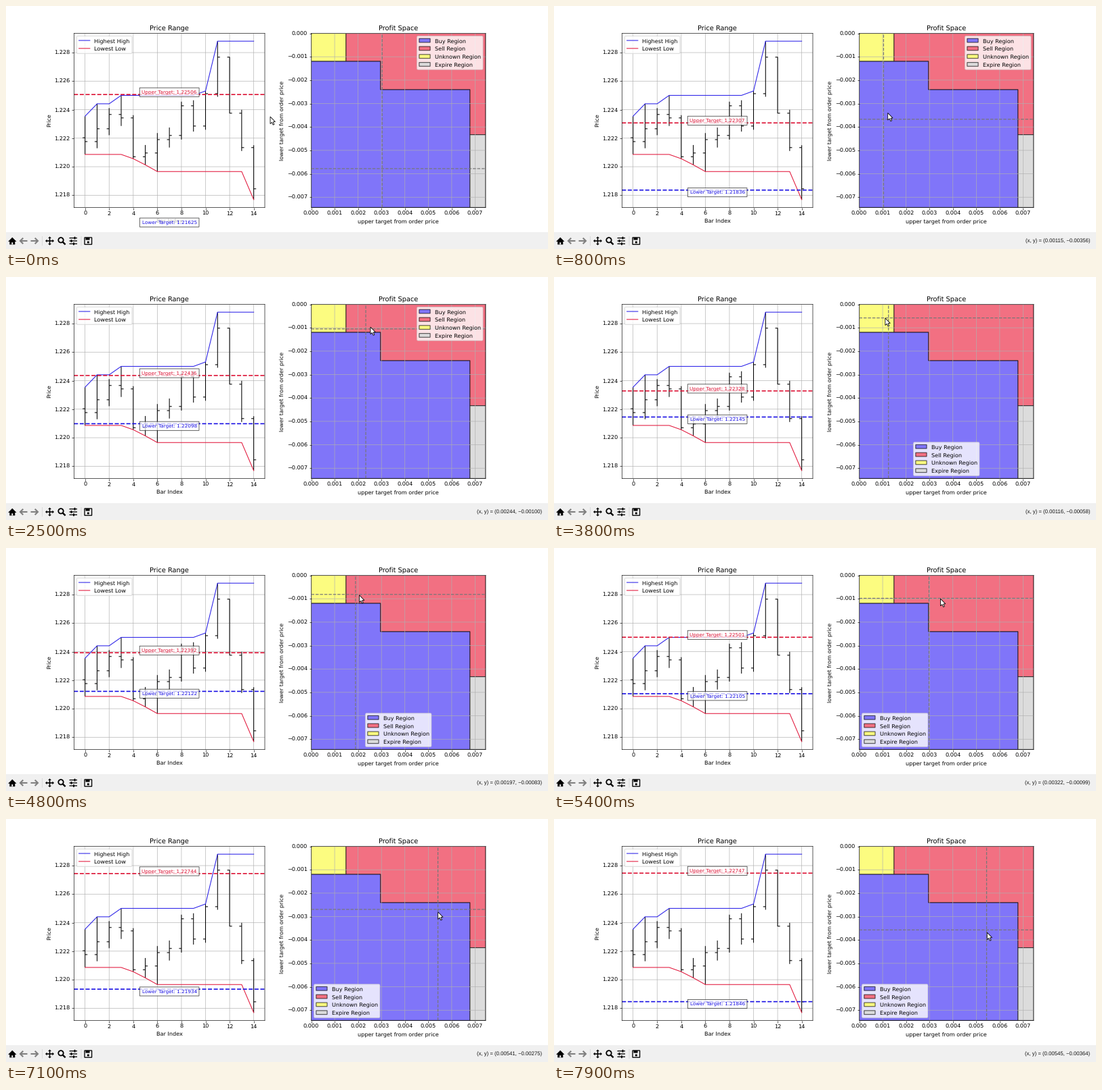
Animation of 800x360 px, one loop 8000 ms. Source, as a matplotlib script:

```python
import numpy as np
import matplotlib.pyplot as plt
from matplotlib.animation import FuncAnimation
from matplotlib.patches import Circle, Polygon, Rectangle
from matplotlib.ticker import MultipleLocator

W, H = 800, 360
FRAMES, STEP = 80, 100
S = 0.584  # scale of all point sizes
UNIT = 1e-5
ORDER = 1.22203

BLUE, RED = "#2a20e8", "#e2183c"
BUY, SELL, UNKNOWN, EXPIRE = "#8075f9", "#f27082", "#fcfc80", "#dcdcdc"

rc = plt.rcParams
rc["font.family"] = "DejaVu Sans"
rc["text.hinting"] = "none"
rc["path.snap"] = False
for key in ("font.size", "axes.linewidth", "axes.titlepad", "axes.labelpad",
            "grid.linewidth", "patch.linewidth", "lines.linewidth",
            "xtick.major.size", "xtick.major.width", "xtick.major.pad",
            "ytick.major.size", "ytick.major.width", "ytick.major.pad"):
    rc[key] *= S

fig = plt.figure(figsize=(8, 3.6), dpi=100, facecolor="white")


def add_axes(x0, x1, title, xlabel, ylabel, xlim, ylim, xstep, ystep):
    top, bottom = 40.5, 298.5
    ax = fig.add_axes([x0 / W, 1 - bottom / H, (x1 - x0) / W, (bottom - top) / H])
    ax.set(title=title, xlabel=xlabel, ylabel=ylabel, xlim=xlim, ylim=ylim)
    ax.xaxis.set_major_locator(MultipleLocator(xstep))
    ax.yaxis.set_major_locator(MultipleLocator(ystep))
    ax.grid(True)
    return ax


# Price chart: each bar opens at the last close, long bodies have short wicks
price = add_axes(100.3, 382, "Price Range", "Bar Index", "Price",
                 (-0.92, 14.92), (1.21714, 1.22935), 2, 0.002)
bars = np.arange(15)
close = 1.21 + UNIT * np.array([1176, 1266, 1366, 1342, 1070, 1096, 1190, 1219,
                                1427, 1285, 1512, 1768, 1375, 1134, 845])
open_ = np.r_[ORDER, close[:-1]]
wick = 60 * UNIT - 0.15 * abs(close - open_)
high = np.maximum(open_, close) + wick
low = np.minimum(open_, close) - wick
high[[0, 1, 3, 10, 11]] = 1.22354, 1.22441, 1.22500, 1.22531, 1.22880
low[[0, 4, 5, 6, 14]] = 1.22086, 1.22056, 1.22013, 1.21966, 1.21769

bar_style = dict(color="black", lw=1.3 * S, zorder=2)
price.vlines(bars, low, high, **bar_style)
price.hlines(open_, bars - 0.2, bars, **bar_style)
price.hlines(close, bars, bars + 0.2, **bar_style)
price.plot(bars, np.maximum.accumulate(high), color=BLUE, lw=1.3 * S,
           label="Highest High")
price.plot(bars, np.minimum.accumulate(low), color=RED, lw=1.3 * S,
           label="Lowest Low")
price.legend(loc="upper left")


def target(color, va):
    line = price.axhline(ORDER, color=color, ls="--", lw=2 * S)
    box = dict(boxstyle="square,pad=0.44", facecolor="white",
               edgecolor="black", alpha=0.75)
    label = price.text(7, ORDER, "", color=color, size=9 * S, ha="center",
                       va=va, bbox=box)
    return line, label


upper = target("#dc0f32", "bottom")
lower = target("#160ce4", "top")

# Profit regions, in thousandths
XMAX, YMAX = 7.45, 7.44
profit = add_axes(450.5, 708, "Profit Space", "upper target from order price",
                  "lower target from order price",
                  (0, XMAX / 1000), (-YMAX / 1000, 0), 0.001, 0.001)
A, B, C = 1.48, 2.96, 6.78
P, Q, R = -1.19, -2.4, -4.33
stairs = [(B, P), (B, Q), (C, Q)]
regions = [
    ("Buy Region", BUY, [(0, P), *stairs, (C, -YMAX), (0, -YMAX)]),
    ("Sell Region", SELL, [(A, 0), (A, P), *stairs, (C, R), (XMAX, R), (XMAX, 0)]),
    ("Unknown Region", UNKNOWN, [(0, 0), (A, 0), (A, P), (0, P)]),
    ("Expire Region", EXPIRE, [(C, R), (XMAX, R), (XMAX, -YMAX), (C, -YMAX)]),
]
for name, color, pts in regions:
    profit.add_patch(Polygon(np.array(pts) / 1000, facecolor=color, label=name,
                             edgecolor=(0, 0, 0, 0.6), lw=1.5 * S))
cross_style = dict(color="#777777", ls="--", lw=1.5 * S)
cross_x = profit.axvline(0, **cross_style)
cross_y = profit.axhline(0, **cross_style)
legend = profit.legend(loc="upper right")

# Legend takes the first place that the crosshair leaves free
PLACES = "upper right", "lower left", "center left", "lower center", "center"
SHARE = dict(left=0, upper=0, center=0.5, right=1, lower=1)
BOX_W, BOX_H, PAD = 282, 150, 12


def best_place(x, y):
    for name in PLACES:
        words = name.split()
        left = PAD + SHARE[words[-1]] * (100 * XMAX - 2 * PAD - BOX_W)
        top = PAD + SHARE[words[0]] * (100 * YMAX - 2 * PAD - BOX_H)
        if not (left <= x <= left + BOX_W or top <= -y <= top + BOX_H):
            return name
    return PLACES[0]


# Toolbar and pointer, in pixels
ui = fig.add_axes([0, 0, 1, 1], zorder=10)
ui.set(xlim=(0, W), ylim=(H, 0))
ui.axis("off")
BAR, MID = "#f0f0f0", 348


def block(x, y, w, h, color="black"):
    ui.add_patch(Rectangle((x, y), w, h, color=color, lw=0))


def stroke(pts, color="black", px=1.6):
    ui.plot(*zip(*pts), color=color, lw=px * 0.72, solid_capstyle="butt",
            solid_joinstyle="miter")


def triangle(x, y, dx, dy, length, half):
    ui.add_patch(Polygon([(x + length * dx, y + length * dy),
                          (x + half * dy, y + half * dx),
                          (x - half * dy, y - half * dx)], color="black", lw=0))


def arrow(tip, way):
    stroke([(tip + 4.3 * way, MID - 4.3), (tip, MID), (tip + 4.3 * way, MID + 4.3)],
           "#808080", 2.1)
    stroke([(tip, MID), (tip + 10.5 * way, MID)], "#808080", 2.1)


def draw_toolbar():
    block(0, 335, W, 25, BAR)
    for x in (53, 110.5):
        block(x, 341, 1, 14, "#dadada")

    triangle(9.3, 349, 0, -1, 6.3, 6.2)
    block(5.3, 348, 8, 5.4)
    block(8.3, 350.2, 2, 3.2, BAR)
    arrow(21, 1)
    arrow(47, -1)

    for dx, dy in ((1, 0), (-1, 0), (0, 1), (0, -1)):
        stroke([(64.5, MID), (64.5 + 5 * dx, MID + 5 * dy)])
        triangle(64.5 + 4 * dx, MID + 4 * dy, dx, dy, 2.5, 2.4)

    ui.add_patch(Circle((81, 346.8), 3.7, fill=False, ec="black", lw=1.3))
    stroke([(83.6, 349.4), (87.6, 353.4)], px=2.4)

    for y, knob in ((MID - 4.3, 101.5), (MID, 96.5), (MID + 4.3, 100)):
        stroke([(93.5, y), (105, y)], px=1.3)
        stroke([(knob, y - 1.9), (knob, y + 1.9)], px=1.9)

    ui.add_patch(Rectangle((116, 343), 10.6, 10.2, fill=False, ec="black", lw=0.95))
    block(117.5, 343, 6, 3.6)
    ui.add_patch(Circle((121.3, 350), 1.6, color="black", lw=0))


draw_toolbar()
readout = ui.text(791, MID, "", family="Liberation Sans", size=7.8 * 0.72,
                  ha="right", va="center", color="#111111")
POINTER = np.array([(0, 0), (0, 10.6), (2.4, 8.4), (4.2, 12.2),
                    (5.9, 11.5), (4.2, 7.8), (7.4, 7.6)])
pointer = Polygon(POINTER, facecolor="white", edgecolor="black", lw=0.6)
ui.add_patch(pointer)

# Key points of the pointer: step, where it was one step before, where it is
START = (-175, -356)
REST = (303, -578)  # crosshair until the pointer enters the plot
KEYS = [
    (8, (104, -367), (122, -340)),
    (25, (233, -105), (253, -97)),
    (38, (125, -58), (111, -59)),
    (54, (298, -98), (347, -100)),
    (63, (500, -160), (538, -180)),
    (79, (544, -357), (546, -368)),
]
knots = np.array([0] + [k[0] + d for k in KEYS for d in (-1, 0)])
points = np.array([START] + [p for k in KEYS for p in k[1:]], float)

# Monotone cubic tangents
slope = np.diff(points, axis=0) / np.diff(knots)[:, None]
s0, s1 = slope[:-1], slope[1:]
same = s0 * s1 > 0
tangent = np.zeros_like(points)
tangent[1:-1] = np.where(same, 2 * s0 * s1 / np.where(same, s0 + s1, 1), 0)


def path(t):
    t = max(t, 0)
    i = min(np.searchsorted(knots, t, side="right") - 1, len(knots) - 2)
    h = knots[i + 1] - knots[i]
    u = (t - knots[i]) / h
    rise = u * u * (3 - 2 * u)
    return (points[i] * (1 - rise) + points[i + 1] * rise
            + h * u * (1 - u) * ((1 - u) * tangent[i] - u * tangent[i + 1]))


def place_target(parts, name, value):
    line, label = parts
    line.set_ydata([value, value])
    label.set_y(value)
    label.set_text(f"{name} Target: {value:.5f}")


def update(n):
    # The crosshair trails the pointer by one step, the readout by half
    x, y = path(n - 1)
    if x < 0:
        x, y = REST
    cross_x.set_xdata([x * UNIT] * 2)
    cross_y.set_ydata([y * UNIT] * 2)
    place_target(upper, "Upper", ORDER + x * UNIT)
    place_target(lower, "Lower", ORDER + y * UNIT)
    legend.set_loc(best_place(x, y))

    rx, ry = path(n - 0.5) * UNIT
    text = f"(x, y) = ({rx:.5f}, {ry:.5f})".replace("-", "\u2212")
    readout.set_text(text if rx >= 0 else "")

    px, py = path(n)
    pointer.set_xy(POINTER + (450.5 + px * 0.34564, 40.5 - py * 0.34677))
    return []


anim = FuncAnimation(fig, update, frames=FRAMES, interval=STEP,
                     init_func=lambda: [], repeat=True, repeat_delay=0)
plt.show()
```
